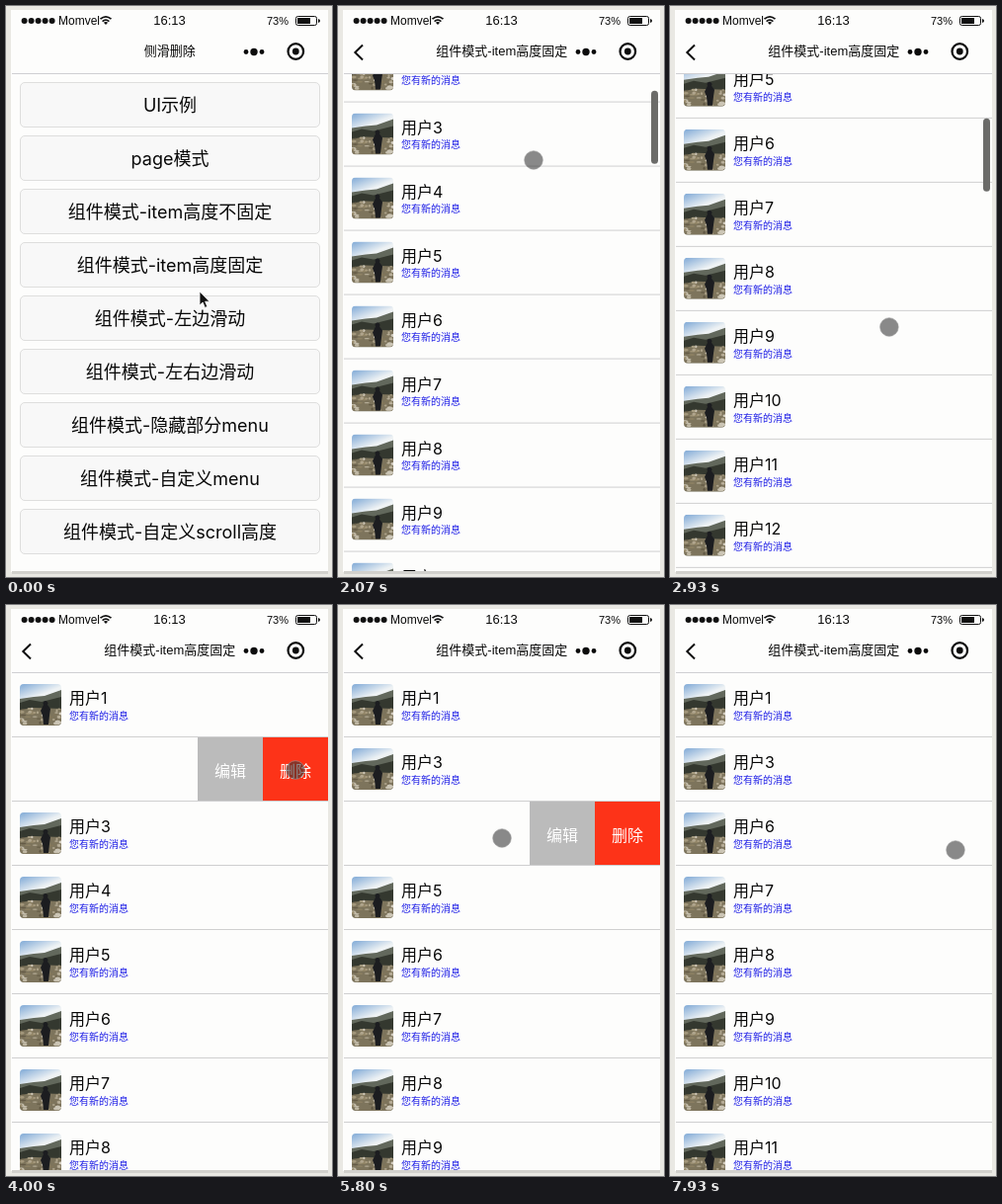
Write an HTML page that moves like this. It is 330 by 578 pixels and loops after 8 s.

```html
<!DOCTYPE html>
<html lang="zh-CN">
<head>
<meta charset="utf-8">
<title>侧滑删除</title>
<style>
html, body { margin: 0; width: 100%; height: 100%; overflow: hidden; background: #e9e8e3; }
svg { display: block; width: 100vw; height: 100vh; }
text { font-family: "Liberation Sans", "Noto Sans CJK SC", "Noto Sans CJK", sans-serif; fill: #080808; }
.wide { font-family: Inter, "Noto Sans CJK SC", "Noto Sans CJK", sans-serif; }
.mid { text-anchor: middle; }
</style>
</head>
<body>
<svg id="stage" viewBox="0 0 330 578">
  <defs>
    <clipPath id="view"><rect x="6" y="69" width="320" height="503"/></clipPath>
    <clipPath id="round"><rect width="42" height="42" rx="4"/></clipPath>
    <linearGradient id="sky" x2="0.4" y2="1">
      <stop offset="0" stop-color="#7fa9d6"/><stop offset="0.4" stop-color="#eef2f4"/>
    </linearGradient>
    <g id="photo" clip-path="url(#round)">
      <rect width="42" height="42" fill="url(#sky)"/>
      <path d="M0 15L14 13L25 12L42 6V30H0Z" fill="#62685c"/>
      <path d="M0 19L10 16L22 18L42 13V30H0Z" fill="#34382f"/>
      <path d="M0 26L14 24L42 25V42H0Z" fill="#7d745c"/>
      <g id="rocks"></g>
      <path d="M24 21a2.5 2.5 0 1 1 4 0l3 4-1 7-1 9h-5l-1-9-2-5z" fill="#1c1d20"/>
    </g>
  </defs>

  <rect x="5" y="4" width="321" height="569" fill="#fdfdfc"/>
  <rect x="6" y="572" width="320" height="3" fill="#d2d1cd"/>
  <g clip-path="url(#view)">
    <g id="menu"></g>
    <g id="page">
      <rect id="paper" x="6" y="69" width="322" height="504"/>
      <g id="list"></g>
      <rect id="bar" x="317" width="7" height="74" rx="3.5" fill="#6b6b69"/>
    </g>
  </g>

  <path d="M6 68.5H326" stroke="#cfcfd2"/>
  <g id="dots"></g>
  <text x="53" y="18.5" font-size="12">Momvel</text>
  <path d="M95.5 13.2Q101 8.4 106.5 13.2M97.6 15.6Q101 12.7 104.4 15.6" fill="none" stroke="#111" stroke-width="1.7"/>
  <path d="M98.9 16.7Q101 15.2 103.1 16.7L101 19Z" fill="#111"/>
  <text class="mid" x="165.5" y="18.5" font-size="13">16:13</text>
  <text x="264" y="18.5" font-size="11">73%</text>
  <rect x="293.5" y="10.5" width="21" height="9" rx="2" fill="none" stroke="#111"/>
  <rect x="295" y="12" width="13" height="6" fill="#111"/>
  <path d="M316 13v4q2-.3 2-2t-2-2z" fill="#111"/>
  <text id="title" class="mid" x="165.8" y="50.3" font-size="13"></text>
  <path id="back" d="M25 39.5L17.3 47L25 54.5" fill="none" stroke="#111" stroke-width="2"/>
  <g fill="#0c0c0c">
    <circle cx="243" cy="46.5" r="2.4"/><circle cx="251" cy="46.5" r="3.7"/><circle cx="259" cy="46.5" r="2.4"/>
    <circle cx="293.3" cy="46" r="3.4"/>
  </g>
  <circle cx="293.3" cy="46" r="7.8" fill="none" stroke="#0c0c0c" stroke-width="2.2"/>

  <path id="arrow" d="M0 0V14L3.2 11L5.4 16.4L7.8 15.3L5.6 10.2H10Z" fill="#111" stroke="#fff" stroke-width=".8"/>
  <circle id="touch" r="9.3" fill="#323232" fill-opacity=".57" stroke="#999" stroke-opacity=".6"/>
</svg>
<script>
const LOOP = 8000, ROW = 65, TOP = 69, MENU = 132, PAPER = "#fdfdfc";
const DRAG = 390;
const $ = id => document.getElementById(id);

function add(parent, tag, attrs, text) {
  const el = document.createElementNS("http://www.w3.org/2000/svg", tag);
  for (const k in attrs) el.setAttribute(k, attrs[k]);
  if (text) el.textContent = text;
  parent.appendChild(el);
  return el;
}

// Smooth rise from 0 to 1 between two times.
function rise(t, from, to) {
  const p = Math.min(1, Math.max(0, (t - from) / (to - from)));
  return p * p * (3 - 2 * p);
}

let seed = 7;
const random = () => (seed = seed * 16807 % 2147483647) / 2147483647;

// Each row is dragged open, then deleted with a tap.
const swipes = [
  { id: 2, y: 167, start: 3350, tap: 4270 },
  { id: 4, y: 236, start: 5330, tap: 6420 },
  { id: 5, y: 236, start: 6900, tap: 7740 }
];

const stops = [
  { t: 70, x: 196, y: 289 }, { t: 470, x: 219, y: 264 }, { t: 1820, x: 205, y: 257 },
  { t: 2070, x: 198, y: 156 }, { t: 2470, x: 218, y: 137 }, { t: 2980, x: 222, y: 330 }
];
stops.splice(2, 0, { ...stops[1], t: 1400 });
for (const { y, start, tap } of swipes) {
  stops.push({ t: start, x: 288, y }, { t: start + DRAG, x: 166, y }, { t: start + DRAG + 90, x: 166, y },
    { t: tap - 280, x: 293, y }, { t: tap + 60, x: 293, y });
}
stops.push({ t: 7930, x: 289, y: 248 });

function pointer(t) {
  const i = stops.findIndex(s => s.t > t);
  if (i < 1) return i ? stops[stops.length - 1] : stops[0];
  const a = stops[i - 1], b = stops[i], p = rise(t, a.t, b.t);
  return { x: a.x + (b.x - a.x) * p, y: a.y + (b.y - a.y) * p };
}

for (let i = 0; i < 45; i++) {
  const y = 25 + 16 * random(), light = 25 + 55 * random();
  add($("rocks"), "ellipse", {
    cx: 42 * random(), cy: y, rx: 1 + y / 15 * random(), ry: .6 + random(),
    fill: `hsl(42 18% ${light}%)`
  });
}

["UI示例", "page模式", "组件模式-item高度不固定", "组件模式-item高度固定", "组件模式-左边滑动",
 "组件模式-左右边滑动", "组件模式-隐藏部分menu", "组件模式-自定义menu", "组件模式-自定义scroll高度"]
.forEach((label, i) => {
  const y = 77 + 54 * i;
  add($("menu"), "rect", { x: 14.5, y: y + .5, width: 303, height: 45, rx: 4.5, fill: "#f8f8f8", stroke: "#dededd" });
  add($("menu"), "text", { x: 166, y: y + 29.5, "font-size": 18, class: "wide mid" }, label);
});
for (let i = 0; i < 5; i++) add($("dots"), "circle", { cx: 18.6 + 7 * i, cy: 15, r: 3, fill: "#111" });

function action(parent, x, fill, label) {
  add(parent, "rect", { x, width: 66, height: 64.5, fill });
  add(parent, "text", { x: x + 33, y: 40, "font-size": 16, class: "mid", style: "fill:#fff" }, label);
}

const rows = Array.from({ length: 9 }, () => {
  const g = add($("list"), "g", {});
  const body = add(g, "g", {});
  add(body, "use", { href: "#photo", x: 14, y: 11 });
  const name = add(body, "text", { x: 64, y: 31, "font-size": 16, class: "wide" });
  add(body, "text", { x: 64, y: 46.8, "font-size": 10, style: "fill:#1c1ce6" }, "您有新的消息");
  const tools = add(body, "g", {});
  action(tools, 326, "#bbbbbb", "编辑");
  action(tools, 392, "#fd3318", "删除");
  add(g, "path", { d: "M6 64.5H326", stroke: "#cfcfd0" });
  return { g, body, name, tools };
});

const show = (el, on) => el.setAttribute("display", on ? "inline" : "none");
const move = (el, x, y) => el.setAttribute("transform", `translate(${x.toFixed(2)} ${y.toFixed(2)})`);

function drawList(t) {
  const scroll = 500 * (rise(t, 1882, 2535) - rise(t, 2600, 3320));
  const removed = swipes.filter(s => t >= s.tap).map(s => s.id);
  const ids = Array.from({ length: 50 }, (_, i) => i + 1).filter(id => !removed.includes(id));
  const first = Math.floor(scroll / ROW);
  rows.forEach((row, i) => {
    const id = ids[first + i], s = swipes.find(w => w.id === id);
    const shift = s ? MENU * rise(t, s.start, s.start + DRAG) : 0;
    row.name.textContent = "用户" + id;
    move(row.g, 0, TOP + ROW * (first + i) - scroll);
    move(row.body, -shift, 0);
    show(row.tools, shift > 0);
  });
  $("bar").setAttribute("y", 70 + scroll * .156);
  $("bar").setAttribute("opacity", rise(t, 1800, 1880) - rise(t, 3380, 3620));
}

function draw(t) {
  const pushed = t >= 1257, ready = t >= 1600;
  $("title").textContent = pushed ? "组件模式-item高度固定" : "侧滑删除";
  show($("back"), pushed);
  show($("menu"), !ready);
  show($("page"), pushed);
  show($("list"), ready);
  $("paper").setAttribute("fill", ready ? PAPER : "#ececef");
  move($("page"), 320 * (1 - rise(t, 1257, 1537)), 0);
  drawList(t);

  const { x, y } = pointer(t), arrow = t < 140;
  show($("arrow"), arrow);
  show($("touch"), !arrow);
  move($("arrow"), x, y);
  move($("touch"), x, y);
}

const start = performance.now();
function tick() {
  draw((performance.now() - start) % LOOP);
  requestAnimationFrame(tick);
}
tick();
</script>
</body>
</html>
```
